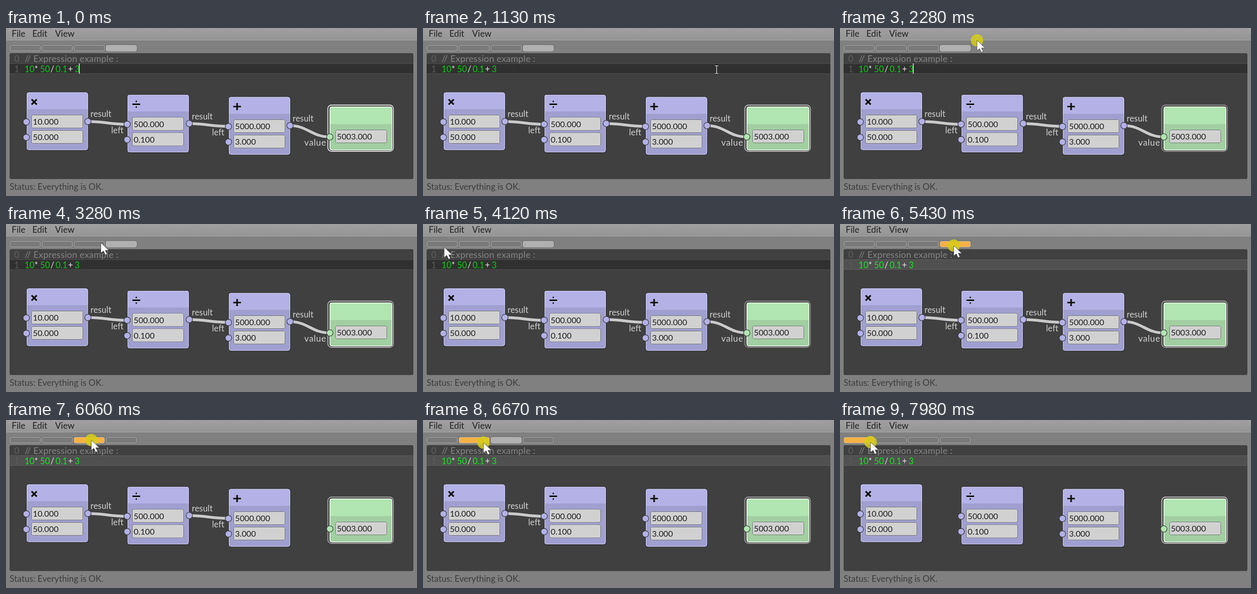
An HTML page that plays this animation: 795 px wide and 327 px high, repeating every 8 s.

```html
<!DOCTYPE html>
<html lang="en">
<head>
<meta charset="utf-8">
<title>Expression editor</title>
<style>
  html, body { margin: 0; width: 100%; height: 100%; overflow: hidden; background: #808080; }
  svg { display: block; width: 100vw; height: 100vh; }
  text { font-family: Lato, "Open Sans", sans-serif; font-size: 15.8px; white-space: pre; }
  .ui { font-size: 16.8px; }
  .code { font-size: 16.3px; }
  .note { font-size: 17.5px; letter-spacing: .2px; }
  .label { fill: #d0d0d0; font-size: 16.4px; }
  .value { font-size: 17px; letter-spacing: .6px; }
</style>
</head>
<body>
<svg id="stage" viewBox="0 0 795 327">
  <defs>
    <linearGradient id="bar" x2="0" y2="1"><stop stop-color="#a0a0a0"/><stop offset="1" stop-color="#959595"/></linearGradient>
  </defs>
</svg>
<script>
const LOOP = 8000, STEP = 76.8;
const stage = document.getElementById('stage');

function add(tag, attrs, parent = stage, content = '') {
  const el = document.createElementNS('http://www.w3.org/2000/svg', tag);
  for (const k in attrs) el.setAttribute(k, attrs[k]);
  if (content) el.textContent = content;
  parent.append(el);
  return el;
}
const box = (x, y, width, height, fill, extra = {}, parent) =>
  add('rect', { x, y, width, height, fill, ...extra }, parent);
const write = (x, y, str, attrs = {}, parent) => add('text', { x, y, ...attrs }, parent, str);
const show = (el, on) => el.setAttribute('visibility', on ? 'visible' : 'hidden');

// Window chrome
box(0, 0, 795, 327, '#808080');
box(0, 0, 795, 23, 'url(#bar)');
box(0, 23, 795, 1, '#a8a8a8');
const ui = { class: 'ui', fill: '#202020' };
write(11, 17, 'File', ui);
write(51, 17, 'Edit', ui);
write(95, 17, 'View', ui);
write(7, 315, 'Status: Everything is OK.', { class: 'ui', fill: '#3c3c3c' });

const tabs = [0, 1, 2, 3].map(i => {
  const x = 7.5 + 62 * i;
  box(x - 1, 32.5, 61, 13.5, 'none', { rx: 4, stroke: '#6a6a6a' });
  return box(x, 33.5, 59, 11.5, '#7a7a7a', { rx: 3, stroke: '#b4b4b4' });
});

// Expression editor
box(7, 49, 781, 245, '#404040', { rx: 3 });
const edge = box(7, 69, 781, 20, '#4b4b4b');
const line = box(7, 70, 781, 18, '#303030');
write(16, 66, '0', { class: 'ui', fill: '#606060' });
write(16, 86, '1', { class: 'ui', fill: '#5a5a5a' });
write(36, 66, '// Expression example :', { class: 'note', fill: '#858585' });
const numbers = [[36, '10'], [66, '50'], [96, '0.1'], [133, '3']].map(([x, s]) =>
  write(x, 86, s, { class: 'code' }));
[[55, '*'], [86, '/'], [120, '+']].forEach(([x, s]) =>
  write(x, 86, s, { class: 'code', fill: '#e8e8e8' }));
const caret = box(141, 69, 1.3, 20, '#fff');

// Links
const links = [[158, 182, 234, 187.5], [354, 186, 430, 191.5], [549, 190, 626, 212]].map(([x1, y1, x2, y2]) => {
  const g = add('g', {});
  const reach = (x2 - x1) * .45;
  const d = `M${x1} ${y1}C${x1 + reach} ${y1} ${x2 - reach} ${y2} ${x2} ${y2}`;
  add('path', { d, fill: 'none', stroke: '#343434', 'stroke-width': 7 }, g);
  add('path', { d, fill: 'none', stroke: '#cacaca', 'stroke-width': 5.4 }, g);
  return g;
});

// Nodes
const VIOLET = ['#b3b1e6', '#a09fd0'], GREEN = ['#b1e5b1', '#a1cfa1'];

function panel(x, y, w, h, head, [light, dark], border, stroke) {
  box(x - 1, y - 1, w + 2.5, h + 2.5, '#262626', { rx: 5, opacity: .8 });
  box(x, y, w, h, dark, { rx: 4 });
  add('path', { d: `M${x} ${y + head}V${y + 4}q0-4 4-4h${w - 8}q4 0 4 4v${head - 4}z`, fill: light });
  box(x + .5, y + .5, w - 1, h - 1, 'none', { rx: 4, stroke: border, 'stroke-width': stroke });
}
function field(x, y, value) {
  box(x, y, 99, 25, '#d1d1d1', { rx: 3, stroke: '#737373' });
  box(x + 1, y + 1, 97, 23, 'none', { rx: 2, stroke: '#dadada' });
  write(x + 2.5, y + 18.5, value, { fill: '#1c1c1c' });
}
const port = (cx, cy, fill, parent) =>
  add('circle', { cx, cy, r: 6.2, fill, stroke: '#333', 'stroke-width': 1.1 }, parent);

function mathNode(x, y, glyph, iconX, a, b) {
  panel(x, y, 118.5, 112, 32.5, VIOLET, '#cfcef2', 1);
  const icon = { d: glyph, stroke: '#111', 'stroke-width': 3.2, fill: '#111' };
  add('path', { ...icon, stroke: '#d0d0f4', transform: `translate(${iconX} ${y + 19.5})` });
  add('path', { ...icon, transform: `translate(${iconX} ${y + 18.5})` });
  field(x + 9.5, y + 44, a);
  field(x + 9.5, y + 74, b);
  port(x - .7, y + 57.3, VIOLET[0]);
  port(x - .7, y + 87.3, VIOLET[0]);
}
mathNode(40, 125.5, 'M-5-5L5 5M5-5L-5 5', 54.5, '10.000', '50.000');
mathNode(235, 130, 'M-7.5 0H7.5M-1.2-5.5H1.2M-1.2 5.5H1.2', 252, '500.000', '0.100');
mathNode(431, 134.5, 'M-7.5 0H7.5M0-7V7', 447, '5000.000', '3.000');

panel(626, 153, 121, 85, 34, GREEN, '#f8fff8', 1.5);
const halo = box(622.5, 150, 126.7, 90, 'none', { rx: 7, 'stroke-width': 1.9 });
field(637.5, 198.5, '5003.000');
port(626.3, 212, GREEN[0]);

// Output ports and labels come and go with their link
const tags = [
  [158.5, 182, 163.5, 172.5, 203.5, 205, 'left'],
  [354.5, 186, 359.5, 177.5, 398.5, 209, 'left'],
  [549.5, 190, 554.5, 181.5, 577, 229, 'value']
].map(([px, py, rx, ry, ix, iy, name]) => {
  const g = add('g', {});
  port(px, py, VIOLET[0], g);
  write(rx, ry, 'result', { class: 'label' }, g);
  write(ix, iy, name, { class: `label ${name}` }, g);
  return g;
});

// Mouse
const mouse = add('g', {});
const spot = add('circle', { r: 12, fill: '#d6cd18', opacity: .85 }, mouse);
const arrow = add('path', {
  d: 'M0 0V20L5 16 8.5 23.5 12 22 8.7 15H15.5Z', fill: '#fff', stroke: '#444', 'stroke-width': .8
}, mouse);
const beam = add('g', { fill: 'none' }, mouse);
for (const [stroke, width] of [['#222', 3], ['#eee', 1.2]])
  add('path', { d: 'M-3.5-7.5H3.5M0-7.5V7.5M-3.5 7.5H3.5', stroke, 'stroke-width': width }, beam);

// time, x, y
const path = [
  [600, 600, 350], [1130, 568, 81], [1210, 560, 62], [1360, 500, 50], [1980, 265, 24],
  [2500, 265, 24], [2880, 245, 38], [3100, 210, 37], [3740, 71, 34], [4050, 41, 45],
  [4230, 41, 45], [4580, 150, 50], [5260, 220, 42], [5670, 220, 42], [5890, 165, 39],
  [6300, 165, 39], [6590, 117, 44], [7215, 117, 44], [7520, 59, 43], [8000, 59, 43]
];
const presses = [[2115, 2580], [5410, 5670], [5960, 6350], [6640, 6820], [7580, 8001]];

function pointAt(t) {
  const i = path.findIndex(p => p[0] >= t);
  if (i < 1) return path[0].slice(1);
  const [t0, x0, y0] = path[i - 1], [t1, x1, y1] = path[i];
  const k = (t - t0) / (t1 - t0), e = k * k * (3 - 2 * k);
  return [x0 + (x1 - x0) * e, y0 + (y1 - y0) * e];
}

function draw(time) {
  // The screen refreshes in fixed steps
  const t = time < 130 ? 0 : 130 + Math.floor((time - 122) / STEP) * STEP;
  const [x, y] = pointAt(t);
  const pressed = presses.some(([a, b]) => t >= a && t < b);
  const focused = t < 5400;

  mouse.setAttribute('transform', `translate(${x.toFixed(1)} ${y.toFixed(1)})`);
  const typing = x > 300 && y > 49 && y < 294;
  show(mouse, t >= 600);
  beam.style.display = typing ? '' : 'none';
  arrow.style.display = typing ? 'none' : '';
  spot.style.display = pressed ? '' : 'none';

  show(caret, focused && (t < 205 || Math.floor((t - 205) / 375) % 2));
  line.setAttribute('fill', focused ? '#303030' : '#505050');
  edge.setAttribute('fill', focused ? '#4b4b4b' : '#606060');
  numbers.forEach(n => n.setAttribute('fill', focused ? '#06d00e' : '#12ec1c'));

  const active = t < 6030 ? 3 : t < 6700 ? 2 : t < 7640 ? 1 : 0;
  tabs.forEach((tab, i) => {
    const hot = pressed && y > 33 && Math.floor((x - 6) / 62) === i;
    tab.setAttribute('fill', hot ? '#f6b144' : i === active ? '#b0b0b0' : '#7a7a7a');
  });

  const count = t < 5960 ? 3 : t < 6640 ? 2 : t < 7580 ? 1 : 0;
  links.forEach((g, i) => { show(g, i < count); show(tags[i], i < count); });

  const glow = .5 + .5 * Math.cos((t - 28) / 620 * 2 * Math.PI);
  const v = Math.round(122 + 92 * glow);
  halo.setAttribute('stroke', `rgb(${v},${v},${v})`);
}

const start = performance.now();
function tick() {
  draw((performance.now() - start) % LOOP);
  requestAnimationFrame(tick);
}
tick();
</script>
</body>
</html>
```
